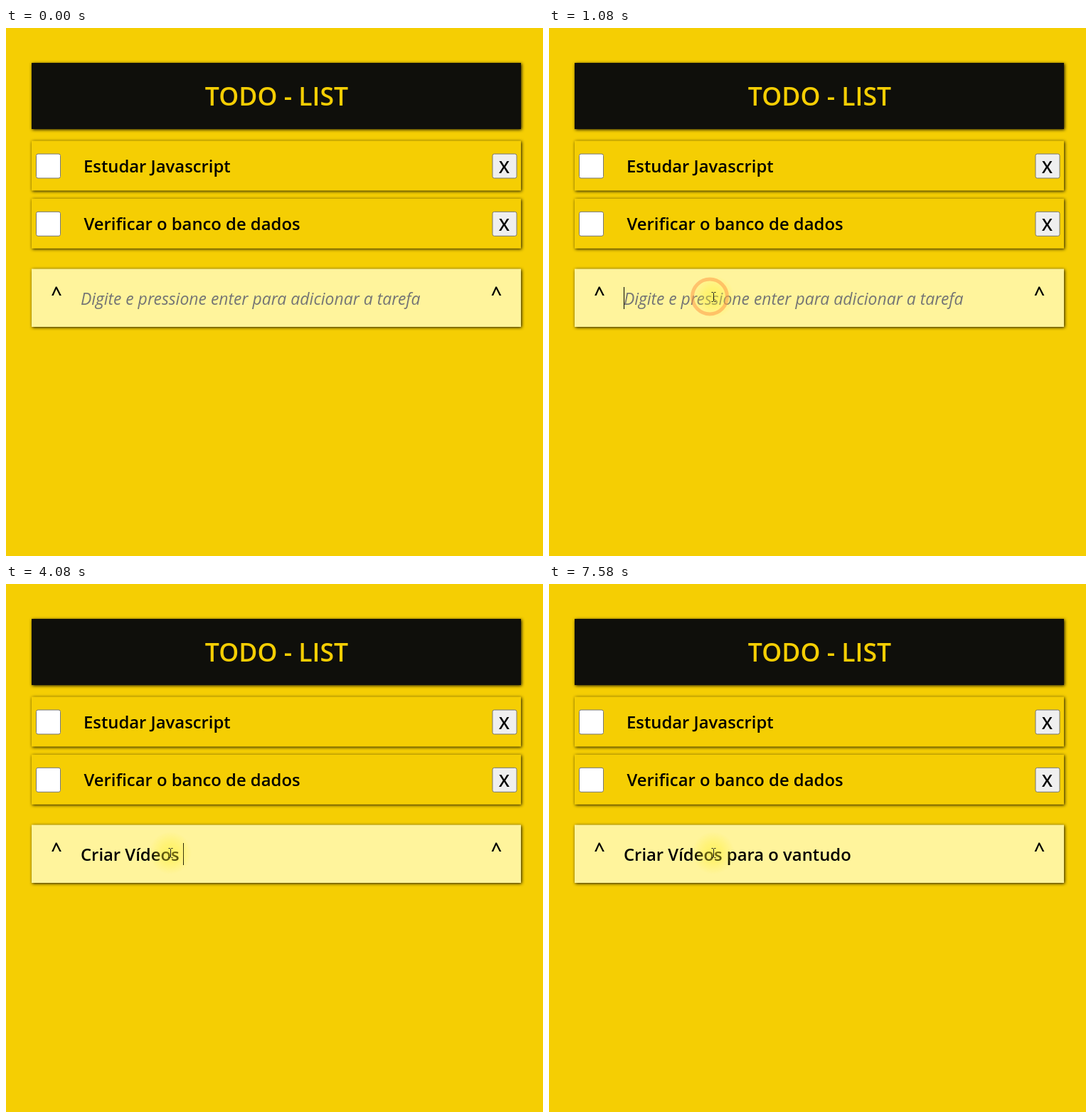
Write an HTML page that moves like this. It is 755x742 px and loops after 8000 ms.

```html
<!DOCTYPE html>
<html lang="pt">
<head>
<meta charset="utf-8">
<title>Todo list</title>
<style>
  html, body { margin: 0; width: 100%; height: 100%; overflow: hidden; background: #f5ce03; }
  svg { display: block; width: 755px; height: 742px; }
  text { font: 600 23.85px "Open Sans", "Noto Sans", sans-serif; white-space: pre; }
  .mid { text-anchor: middle; }
  .panel { filter: drop-shadow(1px 1px 2px rgba(0, 0, 0, .9)); }
  .box { stroke: #767676; }
  #title { font-size: 35.6px; fill: #f5ce03; }
  #hint { font-size: 23px; font-weight: 400; font-style: italic; fill: #757575; }
  .hat { font-size: 27px; }
</style>
</head>
<body>
<svg viewBox="0 0 755 742">
  <defs>
    <radialGradient id="glow">
      <stop offset="0" stop-color="#fff02a" stop-opacity=".5"/>
      <stop offset=".45" stop-color="#fff02a" stop-opacity=".34"/>
      <stop offset="1" stop-color="#fff02a" stop-opacity="0"/>
    </radialGradient>
    <g id="row">
      <rect class="panel" x="36" y="158.5" width="688" height="70" fill="#f5ce03"/>
      <rect class="box" x="42.5" y="177" width="34" height="34" rx="2.5" fill="#fff"/>
      <rect class="box" x="684" y="177" width="34" height="34" rx="2.5" fill="#efefef"/>
      <text class="mid" x="700.5" y="204">X</text>
    </g>
  </defs>
  <rect width="755" height="742" fill="#f5ce03"/>
  <rect class="panel" x="36" y="49" width="688" height="93" fill="#0f0f0b"/>
  <text id="title" class="mid" x="380.5" y="109">TODO - LIST</text>

  <use href="#row"/>
  <text x="109" y="203">Estudar Javascript</text>
  <use href="#row" y="81.3"/>
  <text x="109.5" y="284">Verificar o banco de dados</text>

  <rect class="panel" x="36" y="338.5" width="688" height="81.5" fill="#fff49c"/>
  <text class="hat mid" x="71" y="383">^</text>
  <text class="hat mid" x="689.5" y="383">^</text>
  <text id="hint" x="105" y="389">Digite e pressione enter para adicionar a tarefa</text>
  <text id="typed" x="105" y="389"></text>
  <rect id="caret" y="364" width="1" height="31"/>

  <circle id="halo" r="30" fill="url(#glow)"/>
  <circle id="ring" cx="226" cy="377.5" fill="none" stroke="#ff9c4a" stroke-width="5"/>
  <path id="arrow" d="M0 0V15.5L3.6 12.2L6.2 18L8.6 17L6.1 11.3H11Z" fill="#fff" stroke="#111"/>
  <path id="beam" d="M-3 -6.5H-1L0 -5.5L1 -6.5H3M0 -5.5V5.5M-3 6.5H-1L0 5.5L1 6.5H3" fill="none" stroke="#222"/>
</svg>
<script>
const LOOP = 8000, TICK = 1000 / 12, BLINK = 575, LEFT = 105;
const FOCUS = 750, RING_START = 825, RING_END = 1325;
const TASK = "Criar Vídeos para o vantudo";
const KEYS = [1500, 1750, 1920, 2000, 2170, 2250, 2920, 3500, 3580, 3750, 3830, 4000, 4080, 4250,
  4420, 4500, 4580, 4670, 4920, 5170, 5830, 6080, 6250, 6500, 6580, 6830, 7000];
// Pointer path: time, x, y
const PATH = [[330, 52, 338], [500, 120, 347], [667, 190, 367], [750, 214, 375],
  [917, 226, 377.5], [1000, 226, 377.5], [1083, 231, 378]];

const el = id => document.getElementById(id);
const [hint, typed, caret, halo, ring, arrow, beam] =
  ["hint", "typed", "caret", "halo", "ring", "arrow", "beam"].map(el);
const show = (node, on) => node.setAttribute("visibility", on ? "visible" : "hidden");
const move = (node, x, y) => node.setAttribute("transform", `translate(${x} ${y})`);

function pointerAt(t) {
  const i = PATH.findIndex(p => p[0] > t);
  if (i < 0) return PATH[PATH.length - 1].slice(1);
  if (i === 0) return PATH[0].slice(1);
  const [a, b] = [PATH[i - 1], PATH[i]];
  const k = (t - a[0]) / (b[0] - a[0]);
  return [a[1] + (b[1] - a[1]) * k, a[2] + (b[2] - a[2]) * k];
}

function drawInput(t) {
  const count = KEYS.filter(k => k <= t).length;
  const lastKey = count ? KEYS[count - 1] : FOCUS;
  typed.textContent = TASK.slice(0, count);
  show(hint, count === 0);
  const width = count ? typed.getComputedTextLength() : 0;
  caret.setAttribute("x", Math.floor(LEFT + width));
  show(caret, t >= lastKey && t - lastKey < BLINK);
}

function drawPointer(t) {
  const now = Math.floor((t + 4) / TICK) * TICK;
  const [x, y] = pointerAt(now);
  const visible = now >= 330, overText = y > 356;
  move(halo, x, overText ? y : y + 3);
  move(arrow, x + .5, y + .5);
  move(beam, Math.floor(x) + .5, Math.floor(y));
  show(halo, visible);
  show(arrow, visible && !overText);
  show(beam, visible && overText);

  const grow = Math.min(1, (now - RING_START) / 250);
  const fade = Math.min(1, (RING_END - now) / 240);
  show(ring, grow > 0 && fade > 0);
  ring.setAttribute("r", Math.max(0, 8 + 16.5 * grow));
  ring.setAttribute("stroke-opacity", Math.max(0, .55 * fade));
}

function draw(t) {
  drawInput(t);
  drawPointer(t);
}

const start = performance.now();
function loop(now) {
  draw(Math.max(0, now - start) % LOOP);
  requestAnimationFrame(loop);
}
draw(0);
requestAnimationFrame(loop);
</script>
</body>
</html>
```
